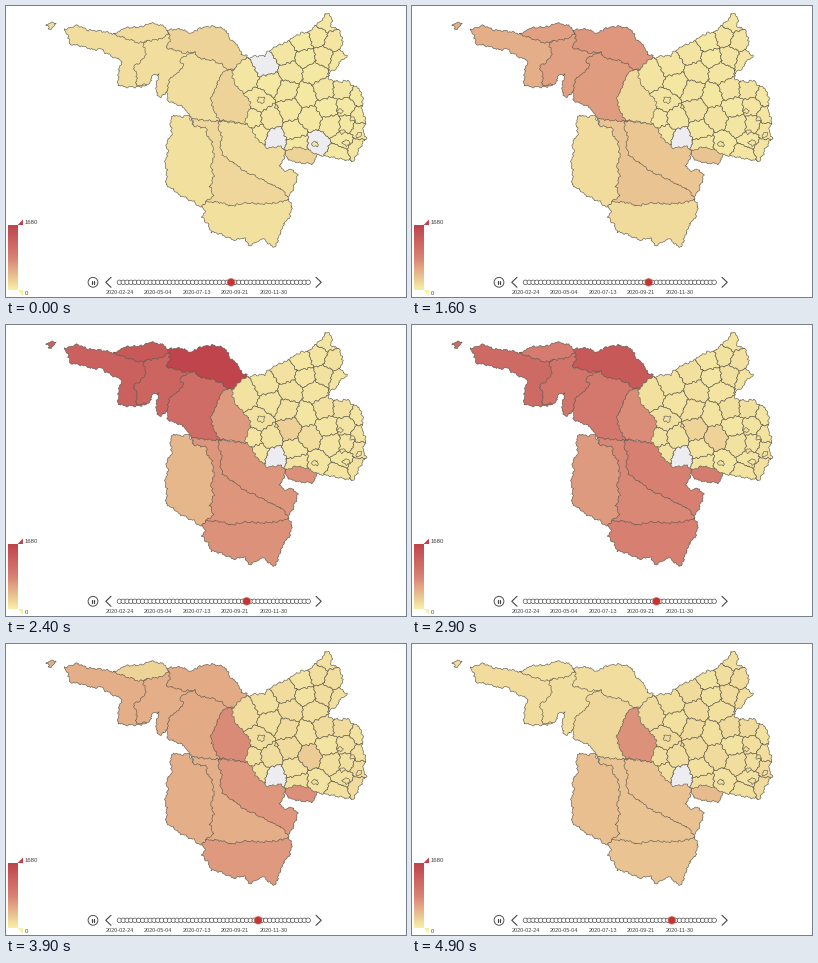
A matplotlib script that plays this animation: 400 px wide and 291 px high, repeating every 5000 ms.

```python
import numpy as np
import matplotlib.pyplot as plt
from matplotlib.animation import FuncAnimation
from matplotlib.colors import LinearSegmentedColormap
from matplotlib.patches import Circle, Polygon
from matplotlib.path import Path

W, H, DPI = 400, 291, 100
PX = 72 / DPI
INK, BORDER = "#444444", "#5f5a50"
NO_DATA = np.array([0.93, 0.93, 0.945])
HEAT = LinearSegmentedColormap.from_list("heat", ["#f6efa6", "#d88273", "#bf444c"])

fig = plt.figure(figsize=(W / DPI, H / DPI), dpi=DPI, facecolor="white")
ax = fig.add_axes([0, 0, 1, 1])
ax.set(xlim=(0, W), ylim=(H, 0))
ax.axis("off")


# ---- geometry -------------------------------------------------------------
def rough(points):
    """Densify a closed outline and shift it by a fixed field, so that
    neighbouring outlines keep sharing the same ragged border."""
    pts = np.reshape(points, (-1, 2)).astype(float)
    dense = []
    for a, b in zip(pts, np.roll(pts, -1, axis=0)):
        n = max(2, int(np.hypot(*(b - a)) / 0.7))
        dense.append(a + (b - a) * np.linspace(0, 1, n, endpoint=False)[:, None])
    x, y = np.concatenate(dense).T
    dx = 0.6 * np.sin(0.93 * y + 0.31 * x) + 0.45 * np.sin(1.9 * y - 0.8 * x + 1)
    dy = 0.6 * np.sin(0.87 * x - 0.37 * y + 2) + 0.45 * np.sin(1.8 * x + 0.9 * y)
    return np.column_stack([x + dx, y + dy])


def area(points, z, clip=None):
    patch = Polygon(rough(points), closed=True, fc="white", ec=BORDER,
                    lw=0.6 * PX, joinstyle="round", zorder=z)
    ax.add_patch(patch)
    if clip is not None:
        patch.set_clip_path(clip, ax.transData)
    return patch


def voronoi_cell(i, seeds, box):
    """Cut a box down to the points closer to seed i than to any other."""
    cell = [np.array(p, float) for p in box]
    for j, other in enumerate(seeds):
        if j == i:
            continue
        normal = other - seeds[i]
        offset = normal @ (other + seeds[i]) / 2
        kept = []
        for a, b in zip(cell, cell[1:] + cell[:1]):
            da, db = normal @ a - offset, normal @ b - offset
            if da <= 0:
                kept.append(a)
            if da * db < 0:
                kept.append(a + (b - a) * da / (da - db))
        cell = kept
    return np.array(cell)


# Painted in this order; later areas cover the hidden edges of earlier ones.
OUTLINES = {
    "ardennes": [160, 70, 161, 86, 162, 95, 175, 100, 182, 106, 186, 113, 196, 115,
                 206, 116, 222, 114, 232, 80, 226, 60, 205, 45, 175, 42],
    "west": [58, 23, 63, 22, 72, 19, 80, 24, 95, 25, 108, 28, 120, 26, 150, 30, 150, 60,
             140, 80, 129, 81, 120, 81, 112, 79, 113, 63, 116, 55, 110, 52, 100, 47,
             95, 43, 88, 44, 75, 40, 64, 38, 62, 29],
    "islet": [40, 20, 44, 17, 50, 17, 47, 21, 43, 24, 42, 21],
    "centre": [137, 37, 150, 30, 163, 27, 175, 42, 188, 46, 178, 50, 174, 54, 178, 60,
               171, 67, 163, 74, 161, 86, 155, 91, 151, 88, 150, 80, 153, 68, 147, 69,
               143, 78, 130, 80, 131, 68, 127, 60, 135, 56, 140, 48],
    "north": [108, 28, 118, 22, 135, 21, 145, 17, 158, 20, 163, 27, 155, 33, 140, 35,
              133, 37, 122, 33],
    "east": [163, 27, 162, 24, 175, 23, 185, 27, 195, 22, 205, 20, 215, 22, 221, 25,
             224, 33, 232, 40, 236, 48, 241, 50, 238, 56, 230, 61, 224, 65, 215, 58,
             205, 54, 192, 52, 188, 46, 178, 47, 170, 44, 160, 42, 164, 35],
    "duchy": [222, 63, 218, 66, 213, 72, 210, 82, 205, 92, 207, 103, 213, 114, 222, 115,
              232, 117, 239, 118, 250, 108, 250, 92, 238, 80, 230, 66],
    "lobe": [279, 145, 285, 138, 300, 139, 313, 146, 310, 152, 306, 158, 295, 157,
             285, 155, 281, 152],
    "vosges": [195, 200, 200, 190, 240, 190, 283, 193, 286, 200, 284, 210, 278, 218,
               273, 230, 270, 241, 262, 238, 258, 232, 250, 236, 243, 240, 238, 232,
               228, 234, 215, 228, 205, 226, 202, 218, 196, 211, 199, 205],
    "moselle": [213, 115, 232, 117, 240, 118, 260, 125, 279, 138, 279, 146, 278, 154,
                273, 160, 279, 165, 286, 163, 292, 170, 288, 180, 285, 188, 280, 191,
                262, 185, 230, 170, 205, 145],
    "meurthe": [186, 113, 206, 115, 213, 115, 212, 122, 216, 130, 214, 140, 217, 150,
                228, 157, 238, 165, 250, 170, 262, 177, 275, 183, 281, 190, 283, 194,
                270, 197, 255, 198, 240, 197, 225, 200, 212, 196, 200, 196, 195, 150],
    "meuse": [168, 109, 175, 111, 183, 109, 188, 120, 200, 122, 201, 130, 206, 136,
              208, 150, 205, 160, 208, 170, 204, 180, 207, 190, 200, 196, 195, 201,
              188, 196, 175, 190, 165, 182, 160, 178, 161, 165, 159, 157, 162, 145,
              160, 138, 166, 128, 164, 116],
}
RHINE = [226, 66, 231, 59, 239, 53, 250, 50, 258, 50, 262, 46, 270, 40, 280, 36, 290, 30,
         296, 27, 304, 26, 308, 20, 317, 14, 319, 8, 322, 7, 326, 13, 325, 20, 333, 24,
         337, 36, 334, 44, 341, 50, 334, 56, 331, 62, 322, 68, 323, 74, 336, 76, 342, 74,
         346, 80, 353, 82, 357, 92, 356, 104, 360, 115, 357, 125, 360, 132, 354, 142,
         348, 155, 340, 154, 325, 151, 312, 149, 300, 143, 290, 141, 280, 145, 275, 140,
         262, 142, 256, 138, 250, 131, 246, 123, 239, 117, 241, 110, 245, 100, 243, 93,
         237, 87, 230, 80, 227, 72]
SEEDS = np.reshape([
    240, 70, 260, 59, 279, 48, 297, 36, 312, 31, 321, 16, 327, 36, 300, 52, 318, 50,
    333, 54, 285, 66, 308, 66, 265, 78, 254, 95, 281, 85, 300, 90, 318, 84, 337, 84,
    352, 90, 247, 113, 264, 112, 284, 103, 304, 112, 322, 101, 340, 100, 354, 110,
    252, 128, 270, 133, 288, 126, 312, 138, 341, 119, 326, 119, 353, 124, 291, 138,
    338, 134, 351, 142, 332, 148], (-1, 2)).astype(float)
TOWNS = [(255, 94, 4), (309, 138, 3.5), (340, 137, 3.5), (336, 126, 2.5),
         (353, 129, 3), (334, 105, 2.5), (270, 101, 2), (347, 113, 2.5)]
GAPS, ALWAYS_EMPTY, WARM_CELL, MILD_CELL = (1, 29), 27, 22, 21

# Share of the scale's maximum, by week since the first date.
WEEKS = [29, 30, 32, 33, 35, 36, 38]
LEVELS = {
    "ardennes": [.08, .08, .38, .68, .48, .32, .11],
    "west": [.08, .07, .30, .77, .62, .30, .09],
    "islet": [.08, .07, .30, .77, .62, .30, .09],
    "centre": [.08, .08, .36, .75, .48, .30, .08],
    "north": [.09, .09, .36, .84, .28, .13, .07],
    "east": [.13, .10, .41, 1.0, .67, .32, .08],
    "duchy": [.13, .07, .10, .39, .52, .46, .43],
    "lobe": [.13, .12, .20, .43, .66, .44, .24],
    "vosges": [.07, .06, .10, .43, .61, .40, .20],
    "moselle": [.08, .05, .19, .41, .64, .41, .21],
    "meurthe": [.11, .06, .20, .41, .53, .30, .20],
    "meuse": [.07, .05, .09, .25, .53, .30, .22],
    "rhine": [.035, .03, .04, .05, .06, .07, .075],
    "warm": [.035, .03, .05, .07, .17, .15, .09],
    "mild": [.03, .03, .05, .12, .08, .08, .08],
}

areas = {name: area(pts, 1 + i / 100) for i, (name, pts) in enumerate(OUTLINES.items())}

rhine_path = Path(rough(RHINE), closed=True)
ax.add_patch(Polygon(rhine_path.vertices, fc="#f6efa6", ec="none", zorder=2))
BOX = [(200, 0), (380, 0), (380, 170), (200, 170)]
cells = [area(voronoi_cell(i, SEEDS, BOX), 2.1, rhine_path) for i in range(len(SEEDS))]
angles = np.linspace(0, 2 * np.pi, 9)[:-1]
towns = [area(np.column_stack([x + r * np.cos(angles), y + 0.8 * r * np.sin(angles)]),
              2.2, rhine_path) for x, y, r in TOWNS]
ax.add_patch(Polygon(rhine_path.vertices, fc="none", ec=BORDER, lw=0.6 * PX, zorder=2.3))
spread = np.random.default_rng(4).uniform(0.7, 1.3, len(SEEDS))


# ---- legend and timeline --------------------------------------------------
def label(x, y, text, size, ha):
    ax.text(x, y, text, fontsize=size * PX, family="Liberation Sans", color=INK,
            ha=ha, va="center_baseline", zorder=5)


def stroke(xs, ys, width):
    ax.plot(xs, ys, color=INK, lw=width * PX, zorder=3, solid_capstyle="round")


ax.imshow(np.linspace(1, 0, 128)[:, None], cmap=HEAT, extent=(2, 11.5, 284, 219),
          aspect="auto", interpolation="bilinear", vmin=0, vmax=1)
ax.set(xlim=(0, W), ylim=(H, 0))
ax.add_patch(Polygon([(11.5, 219), (17, 213.5), (17, 219)], fc=HEAT(1.0), lw=0))
ax.add_patch(Polygon([(11.5, 284), (17, 284), (17, 289.5)], fc=HEAT(0.0), lw=0))
label(19, 216.5, "1680", 6, "left")
label(19, 287, "0", 6, "left")
ax.plot([399.5, 399.5], [0, H], color="#e6e6e6", lw=PX)

MID_Y, FIRST_X, STEP = 276.3, 113.4, 3.852
ax.add_patch(Circle((87, MID_Y), 4.9, fc="white", ec=INK, lw=0.9 * PX))
for x in (85.7, 88.3):
    stroke([x, x], [MID_Y - 1.8, MID_Y + 1.8], 1.2)
stroke([105, 99.8, 105], [MID_Y - 5, MID_Y, MID_Y + 5], 1.1)
stroke([310, 315.2, 310], [MID_Y - 5, MID_Y, MID_Y + 5], 1.1)
stroke([FIRST_X, FIRST_X + 49 * STEP], [MID_Y, MID_Y], 0.8)
for week in range(50):
    ax.add_patch(Circle((FIRST_X + week * STEP, MID_Y), 2.25, fc="white", ec=INK,
                        lw=0.65 * PX, zorder=4))
for i, date in enumerate(["02-24", "05-04", "07-13", "09-21", "11-30"]):
    label(FIRST_X + 10 * i * STEP, 286.3, "2020-" + date, 5.5, "center")
marker = Circle((0, MID_Y), 3.6, fc="#c23531", ec=(0.76, 0.21, 0.19, 0.5),
                lw=1.4 * PX, zorder=6)
ax.add_patch(marker)


# ---- motion ---------------------------------------------------------------
def ease(p):
    p = min(max(p, 0), 1)
    return 4 * p ** 3 if p < 0.5 else 1 - 4 * (1 - p) ** 3


def week_at(t):
    """The timeline moves on by one week about every 500 ms."""
    week = 28 + ease((t + 250) / 300)
    for k in range(10):
        duration = 250 if 1 <= k <= 4 else 300
        week += ease((t - 350 - 500 * k) / duration)
    return week


def draw(frame):
    week = week_at(frame * 100)
    level = {name: np.interp(week, WEEKS, v) for name, v in LEVELS.items()}
    for name, patch in areas.items():
        patch.set_facecolor(HEAT(level[name]))
    missing = max(0, 1 - abs(week - 29))
    for i, patch in enumerate(cells):
        key = {WARM_CELL: "warm", MILD_CELL: "mild"}.get(i, "rhine")
        color = np.array(HEAT(level[key] * spread[i])[:3])
        empty = 1 if i == ALWAYS_EMPTY else missing if i in GAPS else 0
        patch.set_facecolor(color + (NO_DATA - color) * empty)
    for patch in towns:
        patch.set_facecolor(HEAT(level["rhine"]))
    marker.center = (FIRST_X + week * STEP, MID_Y)
    return []


anim = FuncAnimation(fig, draw, frames=50, interval=100, repeat=True, repeat_delay=0)
plt.show()
```
